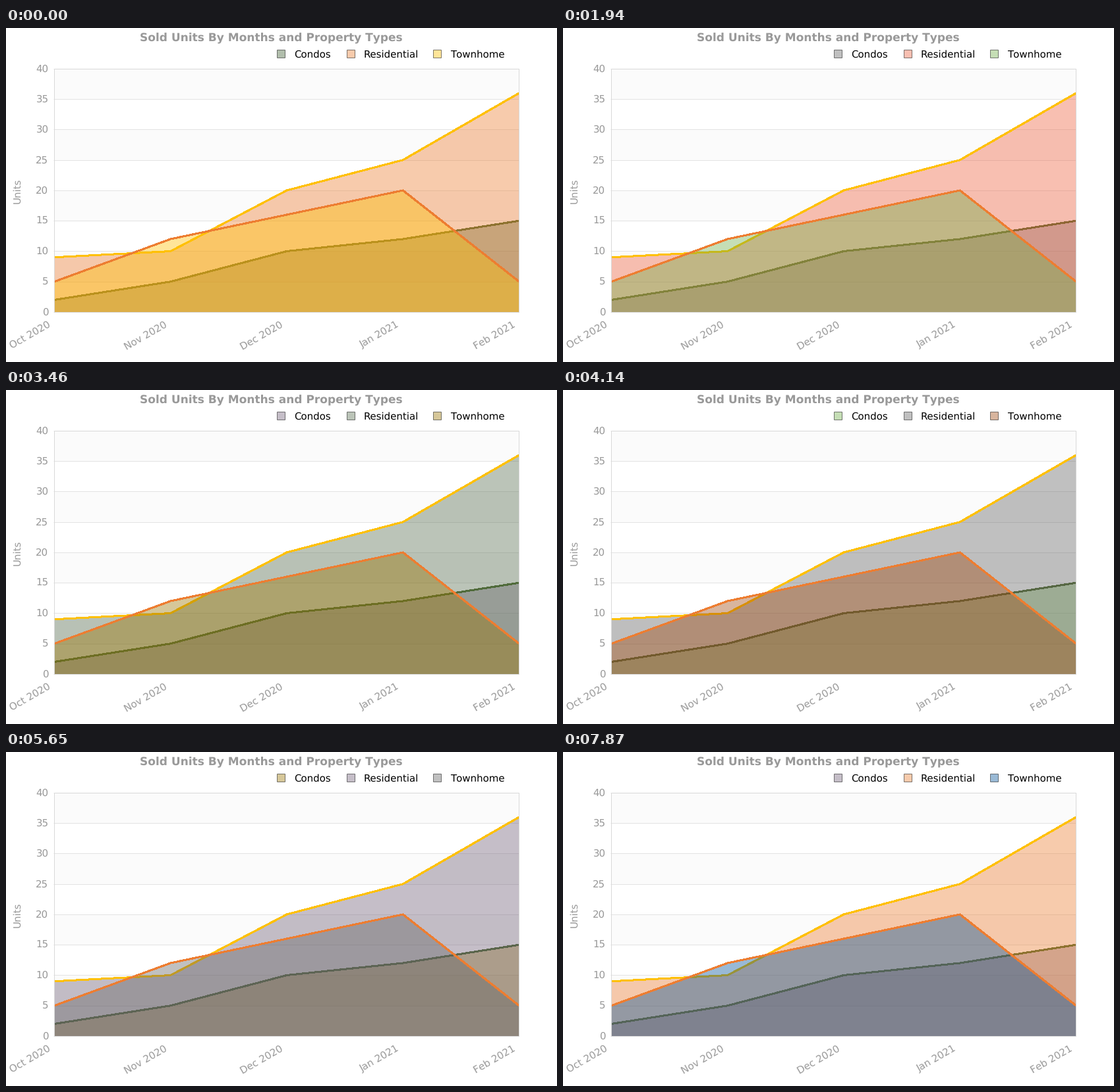
A matplotlib script for the animation above (8000 ms loop, 836x508 px).

```python
import numpy as np
import matplotlib.pyplot as plt
from matplotlib.animation import FuncAnimation
from matplotlib.colors import to_rgb
from matplotlib.patches import Polygon, Rectangle

W, H, DPI = 836, 508, 100
PX = 72 / DPI
LOOP, STEP = 8000, 20
LEFT, RIGHT, TOP, BASE = 73, 778, 62, 432
GRAY = "#999999"
ALPHA = 0.4

plt.rcParams["font.family"] = "DejaVu Sans"
plt.rcParams["text.hinting"] = "none"
plt.rcParams["text.kerning_factor"] = 6  # practically no kerning

# Fill palette
YELLOW, ORANGE, BROWN, OCHRE = "#ffc000", "#ed7d31", "#9e480e", "#997300"
RED, GREEN, FOREST, MOSS = "#ef603e", "#70ad47", "#43682b", "#556c4e"
PINE, BLUE, PLUM, STONE = "#3e5e30", "#005096", "#6e5e76", "#636363"

# Start time in ms, then the fills of the three series
SCHEMES = [
    (0, PINE, ORANGE, YELLOW),
    (400, MOSS, OCHRE, ORANGE),
    (1160, OCHRE, BROWN, PLUM),
    (1940, STONE, RED, GREEN),
    (2700, BROWN, PLUM, MOSS),
    (3460, PLUM, MOSS, OCHRE),
    (4140, GREEN, STONE, BROWN),
    (4890, RED, BLUE, MOSS),
    (5650, OCHRE, PLUM, STONE),
    (6330, FOREST, FOREST, PLUM),
    (7090, BLUE, OCHRE, MOSS),
    (7870, PLUM, ORANGE, BLUE),
]
STARTS = [s[0] for s in SCHEMES]

# Name, values, line colour, legend x
SERIES = [
    ("Condos", (2, 5, 10, 12, 15), "#4e6b2f", 411.5),
    ("Residential", (9, 10, 20, 25, 36), "#ffc000", 517.5),
    ("Townhome", (5, 12, 16, 20, 5), "#ed7d31", 648.5),
]
MONTHS = ["Oct 2020", "Nov 2020", "Dec 2020", "Jan 2021", "Feb 2021"]
XS = np.linspace(LEFT, RIGHT, len(MONTHS)) + 0.5

fig = plt.figure(figsize=(W / DPI, H / DPI), dpi=DPI, facecolor="white")
ax = fig.add_axes([0, 0, 1, 1])
ax.set_xlim(0, W)
ax.set_ylim(H, 0)
ax.axis("off")


def y_of(v):
    return BASE - np.asarray(v) * (BASE - TOP) / 40


def label(x, y, s, size=15, color=GRAY, ha="left", **kw):
    ax.text(x, y, s, fontsize=size * PX, color=color, ha=ha, va="baseline",
            rotation_mode="anchor", **kw)


def box(x, y, w, h, **kw):
    return ax.add_patch(Rectangle((x, y), w, h, lw=PX, snap=False, **kw))


def draw_grid():
    for v in range(0, 41, 5):
        y = np.ceil(y_of(v) - 0.5)
        if v % 10 == 5:
            box(LEFT, y_of(v + 5), RIGHT - LEFT, y_of(v) - y_of(v + 5),
                fc="#fbfbfb", ec="none", zorder=0)
        ax.plot([LEFT, RIGHT], [y + 0.5] * 2, color="#e3e3e3", lw=PX,
                snap=False, zorder=1)
        label(64.5, y + 5, str(v), ha="right")
    box(LEFT + 0.5, TOP + 0.5, RIGHT - LEFT, BASE - TOP,
        fill=False, ec="#d9d9d9", zorder=5)


def draw_labels():
    label(402.5, 20, "Sold Units By Months and Property Types", 17,
          ha="center", weight="bold")
    label(21, 247.5, "Units", ha="center", rotation=90)
    for x, month in zip(XS, MONTHS):
        label(x - 4.5, 453.5, month, ha="right", rotation=30)


def draw_series(name, values, color, lx):
    ys = y_of(values)
    outline = [(XS[0], BASE), *zip(XS, ys), (XS[-1], BASE)]
    area = ax.add_patch(Polygon(outline, ec="none", zorder=2))
    line, = ax.plot(XS, ys, color=color, lw=2 * PX, zorder=2,
                    solid_joinstyle="miter", antialiased=False)
    for artist in (area, line):
        artist.set_clip_path(Rectangle((LEFT + 1, TOP + 1), RIGHT - LEFT - 1,
                                       BASE - TOP - 1, transform=ax.transData))
    swatch = box(lx, 33.5, 12, 12, ec=(0, 0, 0, 0.5))
    label(lx + 25.5, 45, name, color="black")
    return area, swatch


draw_grid()
draw_labels()
fills = [draw_series(*s) for s in SERIES]


def update(i):
    t = i * STEP + STEP / 2
    scheme = SCHEMES[np.searchsorted(STARTS, t, side="right") - 1]
    for pair, color in zip(fills, scheme[1:]):
        for patch in pair:
            patch.set_facecolor((*to_rgb(color), ALPHA))
    return [patch for pair in fills for patch in pair]


anim = FuncAnimation(fig, update, frames=LOOP // STEP, interval=STEP,
                     repeat=True, repeat_delay=0, blit=False)
plt.show()
```
